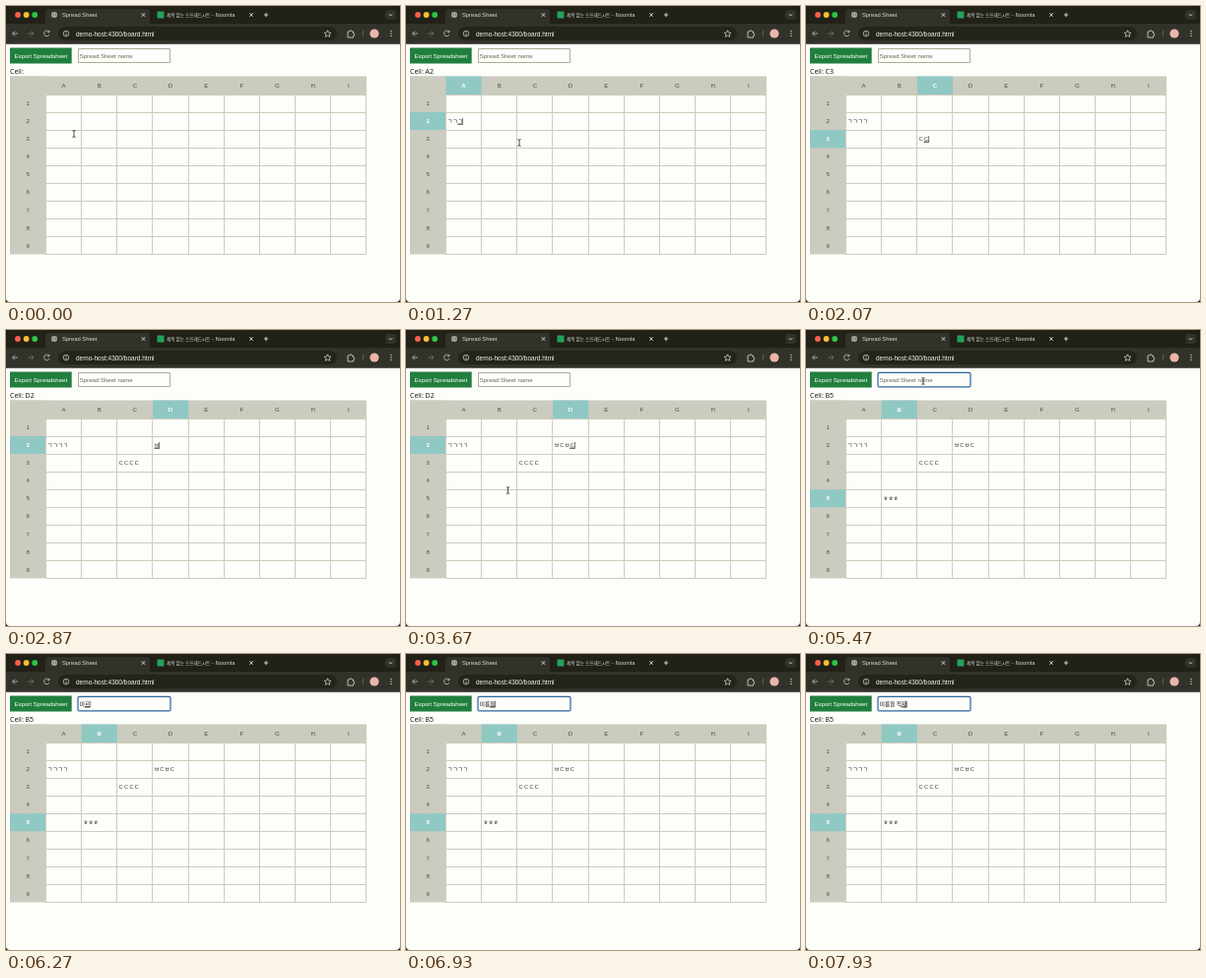
Recreate the animation shown at these times as an HTML page with a canvas. Size 400 px wide and 301 px high, loop 8000 ms.

```html
<!DOCTYPE html>
<html lang="ko">
<meta charset="utf-8">
<title>Spread Sheet</title>
<style>
html, body { margin: 0; width: 100%; height: 100%; overflow: hidden; background: #fdfdf9; }
canvas { display: block; width: 400px; height: 301px; }
</style>
<canvas id="stage" width="400" height="301"></canvas>
<script>
const ctx = document.getElementById('stage').getContext('2d');
const LOOP = 8000;
const SANS = '"Liberation Sans", Arial, sans-serif';
const HANGUL = '"Noto Sans CJK KR", "Noto Sans CJK", sans-serif';
const PAGE = '#fdfdf9', INK = '#222220';
const LEFT = 40.5, TOP = 90, COL = 36.15, ROW = 18.05;

// A cell is selected PICK_LEAD before its first letter; letters follow every KEY_STEP.
const KEY_STEP = 130, PICK_LEAD = 300;
const cells = [
  { col: 0, row: 1, text: 'ㄱㄱㄱㄱ', start: 985 },
  { col: 2, row: 2, text: 'ㄷㄷㄷㄷ', start: 1900 },
  { col: 3, row: 1, text: 'ㅂㄷㅂㄷ', start: 2830 },
  { col: 1, row: 4, text: 'ㅎㅎㅎ', start: 4240 }
];
const FOCUS = 5150, NAME_START = 5760, NAME_STEP = 165;
const nameStates = ['ㅇ', '이', '일', '이르', '이름', '이름ㅇ', '이름으', '이름을',
  '이름을 ', '이름을 ㅈ', '이름을 저', '이름을 적', '이름을 적ㅈ', '이름을 적재'];
const pointerPath = [[0, 69, 130], [400, 66, 119], [1080, 66, 119], [1270, 115, 139],
  [2200, 115, 139], [2480, 156, 120], [3250, 156, 120], [3800, 95, 170],
  [4280, 95, 170], [4400, 122, 102], [4850, 119, 52], [8000, 119, 52]];
const pointerHidden = [[985, 1080], [1900, 2200], [2830, 3250], [4240, 4280], [NAME_START, LOOP]];

function box(x, y, w, h, color, r = 0) {
  ctx.fillStyle = color;
  ctx.beginPath();
  ctx.roundRect(x, y, w, h, r);
  ctx.fill();
}

function frame(x, y, w, h, color, width, r = 0) {
  ctx.strokeStyle = color;
  ctx.lineWidth = width;
  ctx.beginPath();
  ctx.roundRect(x, y, w, h, r);
  ctx.stroke();
}

function dot(x, y, r, color) {
  ctx.fillStyle = color;
  ctx.beginPath();
  ctx.arc(x, y, r, 0, Math.PI * 2);
  ctx.fill();
}

function path(d, color, width = 0.9) {
  ctx.strokeStyle = color;
  ctx.lineWidth = width;
  ctx.stroke(new Path2D(d));
}

function label(text, x, y, size, color, { font = SANS, weight = 400, align = 'left' } = {}) {
  ctx.font = `${weight} ${size}px ${font}`;
  ctx.textAlign = align;
  ctx.textBaseline = 'alphabetic';
  ctx.fillStyle = color;
  ctx.fillText(text, x, y);
}

// Korean input: the last letter is underlined while it is being composed.
function typed(text, x, y, composing) {
  label(text, x, y, 5.7, '#111', { font: HANGUL, weight: 500 });
  if (!composing) return;
  const end = x + ctx.measureText(text).width;
  const begin = x + ctx.measureText(text.slice(0, -1)).width;
  if (!text.endsWith(' ')) box(begin, y + 0.6, end - begin, 1, INK);
  box(end - 0.3, y - 5, 0.6, 6.5, INK);
}

function drawBrowser() {
  const light = '#dcdcd4', dim = '#85857a';
  const strip = '#212118', toolbar = '#32322a';
  box(0, 0, 400, 38.5, strip);
  box(0, 18, 400, 20.5, toolbar);
  box(40, 3, 106, 18, toolbar, 4);
  ['#fb5f50', '#f8bd32', '#30c544'].forEach((c, i) => dot(12 + i * 8.6, 9, 2.9, c));

  dot(49, 9, 3, '#c6c6c0');
  path('M46 9H52M49 6C47 8 47 10 49 12M49 6C51 8 51 10 49 12', '#55554c', 0.6);
  label('Spread Sheet', 57, 11, 5.8, light);
  path('M137.8 7.2L141.2 10.8M141.2 7.2L137.8 10.8', light);

  box(153.5, 5.5, 7, 7, '#20a35a');
  label('제목 없는 스프레드시트', 163, 11, 4.6, light, { font: HANGUL, weight: 500 });
  ctx.save();
  ctx.beginPath();
  ctx.rect(207, 3, 31, 13);
  ctx.clip();
  label('- Noomla', 209, 11, 5.8, light);
  ctx.restore();
  path('M247.3 7.2L250.7 10.8M250.7 7.2L247.3 10.8M261.8 9H266.2M264 6.8V11.2', light);
  box(385, 4, 11, 10, toolbar, 3);
  path('M388.8 8.2L390.5 10L392.2 8.2', light);

  path('M12 28H6.8M9 25.5L6.5 28L9 30.5', light, 0.7);
  path('M22.5 28H27.7M25.5 25.5L28 28L25.5 30.5', dim, 0.7);
  path('M43.5 26A2.8 2.8 0 1 0 44 29M44 24.7V26.7H42', light, 0.7);
  box(53, 21, 283, 14, '#24241c', 7);
  frame(58.2, 25.2, 5.6, 5.6, light, 0.7, 2.8);
  path('M61 27.7V29.8M61 26.2V27', light, 0.8);
  label('demo-host:4300/board.html', 71, 30.5, 6.5, '#f5f5f0');
  path('M326.5 24.7L327.5 27L330 27.2L328.1 28.8L328.7 31.3L326.5 30L324.3 31.3L324.9 28.8L323 27.2L325.5 27Z', light, 0.7);
  path('M347 26H348.6A1.2 1.2 0 0 1 351 26H352.6V28A1.2 1.2 0 0 1 352.6 30.4V32H347Z', light, 0.8);
  path('M362.5 25V31', dim, 0.6);
  dot(374, 28, 4.6, '#e9b7a8');
  for (const y of [25.5, 28, 30.5]) dot(391, y, 0.7, light);
}

function drawForm(t, active) {
  box(4, 42.5, 62.7, 16, '#217f3e');
  label('Export Spreadsheet', 35.3, 52.8, 6.07, '#fff', { align: 'center' });

  if (t >= FOCUS) frame(73, 43.3, 94, 14.6, '#2e659c', 1.2, 1.5);
  else frame(73.5, 43.5, 93, 14, '#a6a68c', 0.9);

  const key = Math.floor((t - NAME_START) / NAME_STEP);
  if (key >= 0) typed(nameStates[Math.min(key, nameStates.length - 1)], 74.7, 52.8, true);
  else label('Spread Sheet name', 74.7, 52.8, 6.07, '#69695c');

  const name = active ? 'ABCDEFGHI'[active.col] + (active.row + 1) : '';
  label('Cell: ' + name, 4, 68.8, 7, '#111', { font: '"Open Sans", sans-serif', weight: 500 });
}

function drawSheet(t, active) {
  const head = '#cbcbbf', picked = '#90c8c4', line = '#cdcdbb', ink = '#4a4a40';
  box(4, 71.5, 362, 18.5, head);
  box(4, 71.5, 36.5, 181, head);
  if (active) {
    box(LEFT + active.col * COL, 71.5, COL, 18.5, picked);
    box(4, TOP + active.row * ROW, 36.5, ROW, picked);
  }
  for (let i = 0; i < 9; i++) {
    const x = LEFT + i * COL, y = TOP + i * ROW;
    const style = on => ({ align: 'center', weight: on ? 700 : 400 });
    const inCol = active && active.col === i, inRow = active && active.row === i;
    label('ABCDEFGHI'[i], x + COL / 2, 83, 6.1, inCol ? '#fff' : ink, style(inCol));
    label(i + 1, 22.2, y + 11.2, 6.1, inRow ? '#fff' : ink, style(inRow));
  }
  for (let i = 0; i <= 9; i++) {
    box(Math.round(LEFT + i * COL - 0.5), TOP, 1, 162, line);
    box(40, Math.round(TOP + i * ROW - 0.5), 326, 1, line);
  }
  for (const cell of cells) {
    const count = Math.floor((t - cell.start) / KEY_STEP) + 1;
    if (count <= 0) continue;
    const x = LEFT + cell.col * COL + 1.5, y = TOP + cell.row * ROW + 11;
    typed(cell.text.slice(0, count), x, y, cell === active && t < FOCUS);
  }
}

function drawPointer(t) {
  if (pointerHidden.some(([from, to]) => t >= from && t < to)) return;
  const i = pointerPath.findIndex(p => p[0] > t);
  const [t0, x0, y0] = pointerPath[i - 1], [t1, x1, y1] = pointerPath[i];
  const k = (t - t0) / (t1 - t0), ease = k * k * (3 - 2 * k);
  ctx.save();
  ctx.translate(x0 + (x1 - x0) * ease, y0 + (y1 - y0) * ease);
  path('M-1.6 -3.4Q0 -3.4 0 -2.4Q0 -3.4 1.6 -3.4M0 -2.6V2.6M-1.6 3.4Q0 3.4 0 2.4Q0 3.4 1.6 3.4', INK, 0.8);
  ctx.restore();
}

function drawCorners() {
  ctx.fillStyle = '#16160f';
  ctx.beginPath();
  ctx.rect(0, 0, 400, 301);
  ctx.roundRect(0, 0, 400, 301, 4);
  ctx.fill('evenodd');
}

const begun = performance.now();
function render() {
  const t = (performance.now() - begun) % LOOP;
  const active = cells.filter(cell => cell.start - PICK_LEAD <= t).pop();
  box(0, 0, 400, 301, PAGE);
  drawBrowser();
  drawForm(t, active);
  drawSheet(t, active);
  drawPointer(t);
  drawCorners();
  requestAnimationFrame(render);
}
render();
</script>
</html>
```
